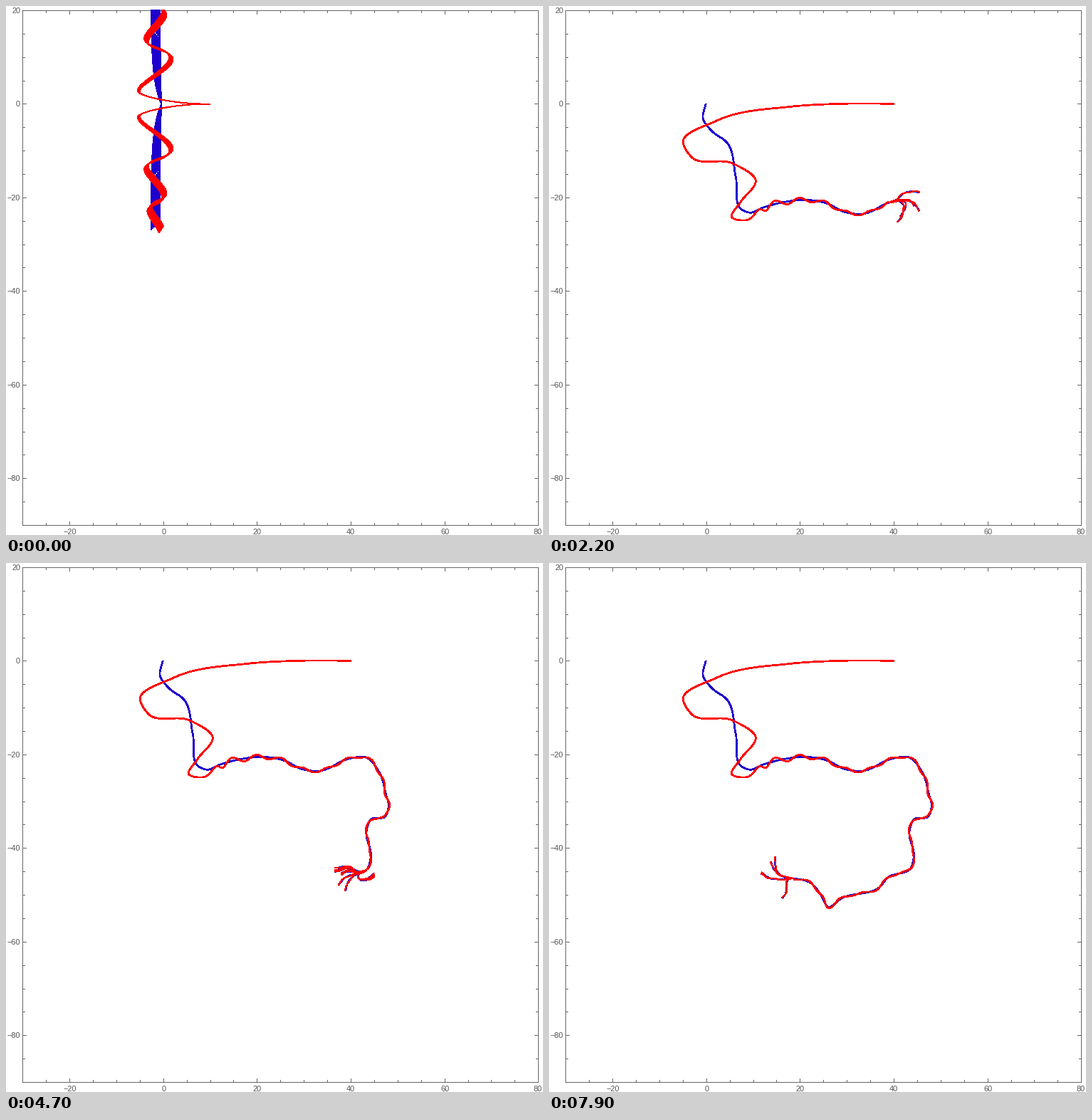
A matplotlib script that plays this animation: 754x743 px, repeating every 8 s.

```python
import numpy as np
import matplotlib.pyplot as plt
from matplotlib.animation import FuncAnimation
from matplotlib.collections import LineCollection

W, H, DPI = 754, 743, 100
FRAMES, STEP = 80, 100
PT = 72 / DPI
BLUE, RED, GREY = "#1e00cc", "#ff0000", "#666666"
THICK, THIN = 1.7 * PT, 0.95 * PT
DS = 1.5  # sampling distance along curves, in pixels


def px(x):
    return 220.7 + 6.582 * x


def py(y):
    return 137.4 - 6.573 * y


def arc(p):
    return np.r_[0, np.cumsum(np.hypot(*np.diff(p, axis=0).T))]


def smooth(pts):
    """Cubic Hermite curve through the points."""
    p = np.asarray(pts, float)
    t = arc(p)
    m = np.gradient(p, t, axis=0)
    s = np.linspace(0, t[-1], int(t[-1] / DS))
    i = np.clip(np.searchsorted(t, s, side="right") - 1, 0, len(t) - 2)
    h = (t[i + 1] - t[i])[:, None]
    u = (s - t[i])[:, None] / h
    return ((2 * u**3 - 3 * u**2 + 1) * p[i] + (u**3 - 2 * u**2 + u) * h * m[i]
            + (3 * u**2 - 2 * u**3) * p[i + 1] + (u**3 - u**2) * h * m[i + 1])


def wobble(p, low, high, period, phase=0.0):
    """Swing a curve sideways, settling from `high` to `low`."""
    s = arc(p)
    d = np.gradient(p, axis=0)
    d /= np.hypot(*d.T)[:, None] + 1e-9
    off = low + (high - low) * np.exp(-s / 70)
    off *= np.sin(2 * np.pi * s / period + phase) * np.minimum(s / 8, 1)
    return p + off[:, None] * np.column_stack([-d[:, 1], d[:, 0]])


def nearest(path, q):
    return int(np.argmin(np.hypot(*(path - q).T)))


# The blue route; red swoops in, then swings around the same route
blue_path = smooth([
    (220, 137), (216, 158), (228, 175), (250, 192), (262, 240), (271, 286),
    (282, 290), (300, 283), (390, 277), (415, 289), (437, 292), (484, 274),
    (503, 272), (526, 298), (533, 324), (537, 340), (532, 356), (512, 360),
    (506, 376), (512, 412), (508, 428), (475, 442), (465, 454), (410, 471),
    (392, 483), (381, 465), (367, 449), (345, 443), (310, 442), (298, 431)])
join = nearest(blue_path, (294, 285))
swoop = smooth([
    (484, 137), (415, 137), (340, 141), (235, 161), (188, 192), (200, 212),
    (258, 221), (290, 245), (268, 276), (256, 296), (279, 300),
    blue_path[join]])
red_path = np.vstack([swoop, wobble(blue_path[join:], 1.3, 6, 34)])
heading = np.arctan2(*np.diff(blue_path, axis=0).T[::-1])
heading = np.unwrap(heading)


def opening():
    """Mirrored bundles: red circles ever closer around drifting blue."""
    blue, red = [], []
    k = np.linspace(0, 5.85, 240)  # half turns
    fall = 5.8 * k**3 / (k**2 + 0.5) - 0.19 * k**2
    fall += 0.7 * np.minimum(k, 1)**3 * np.cos(np.pi * k)
    for sign in (-1, 1):
        for f in np.linspace(0, 1, 7):
            y = np.linspace(0, 25.3 + 1.6 * f, 60)
            x = -0.4 - (0.3 + 1.9 * f) * (1 - np.exp(-y / 5))
            blue.append(np.column_stack([px(x), py(sign * y)]))
            x = 10 / (1 + 1.19 * k) * np.cos(np.pi * k)
            x -= (1.1 + 0.9 * f) * (1 - np.exp(-fall / 5))
            y = fall * (0.95 + 0.05 * f)
            red.append(np.column_stack([px(x), py(sign * y)]))
    return blue, red


def fan(k, start):
    """Bundles that follow the route for a while, then bend away."""
    rng = np.random.default_rng(100 + k)
    reach = 45 + 220 * np.exp(-k / 5)
    swing = 1.3 + 4 * np.exp(-k / 8)
    for b in range(5):
        n = int(reach * rng.uniform(0.8, 1.1) / DS)
        i = np.minimum(start + np.arange(n), len(heading) - 1)
        ramp = np.clip((np.arange(n) / n - rng.uniform(0, 0.5)) / 0.35, 0, 1)
        bend = rng.normal(0, 0.3 if b == 0 else 1.1)
        phase = rng.uniform(0, 2 * np.pi)
        for _ in range(rng.integers(1, 4)):
            a = heading[i] + ramp * (bend + rng.normal(0, 0.06))
            run = np.cumsum(DS * np.column_stack([np.cos(a), np.sin(a)]), axis=0)
            curve = blue_path[start] + np.vstack([[0, 0], run])
            yield curve, wobble(curve, swing / 2, swing, 18 + swing * 4, phase)


def scene(k):
    if k == 0:
        blue, red = opening()
        return blue, red, [THIN]
    split = 150 + 11.4 * k - 0.042 * k**2
    cut = int(split / DS)
    red_cut = nearest(red_path, blue_path[cut])
    blue, red = [blue_path[:cut + 1]], [red_path[:red_cut + 1]]
    for b, r in fan(k, cut):
        blue.append(b)
        red.append(r)
    return blue, red, [THICK] + [THIN] * (len(blue) - 1)


fig = plt.figure(figsize=(W / DPI, H / DPI), dpi=DPI, facecolor="white")
ax = fig.add_axes([0, 0, 1, 1])
# The quarter pixel keeps one-pixel lines on their own pixel when snapped
ax.set_xlim(-0.25, W - 0.25)
ax.set_ylim(H - 0.25, -0.25)
ax.axis("off")

L, R, T, B = 23, 747, 6, 729
area = plt.Rectangle((L, T - 1), R - L, B - T + 1, transform=ax.transData)
lines = []
for color, z in ((BLUE, 2), (RED, 3)):
    lc = LineCollection([], colors=color, zorder=z, antialiaseds=False)
    ax.add_collection(lc, autolim=False)
    lc.set_clip_path(area)
    lines.append(lc)


def label(x, y, v, ha):
    ax.text(x, y, str(v).replace("-", "\u2212"), ha=ha, va="center_baseline",
            family="Liberation Sans", size=11 * PT, color="#555555")


# Frame, ticks on all sides, labels
ticks = [[(L, T), (R, T), (R, B), (L, B), (L, T)]]
for v in range(-85, 81, 5):
    major = v % 20 == 0
    n = 5 if major else 3
    if v >= -25:
        x = round(px(v))
        ticks += [[(x, B), (x, B - n)], [(x, T), (x, T + n)]]
        if major:
            label(min(x, 746), 737.5, v, "center")
    if v <= 20:
        y = round(py(v))
        ticks += [[(L, y), (L + n, y)], [(R, y), (R - n, y)]]
        if major:
            label(20, y, v, "right")
ax.add_collection(LineCollection(ticks, colors=GREY, linewidths=PT, zorder=1,
                                 antialiaseds=False), autolim=False)


def update(k):
    blue, red, widths = scene(k)
    for lc, segs in zip(lines, (blue, red)):
        lc.set_segments(segs)
        lc.set_linewidths(widths)
    return lines


anim = FuncAnimation(fig, update, frames=FRAMES, interval=STEP, repeat=True,
                     repeat_delay=0, blit=False)
plt.show()
```
